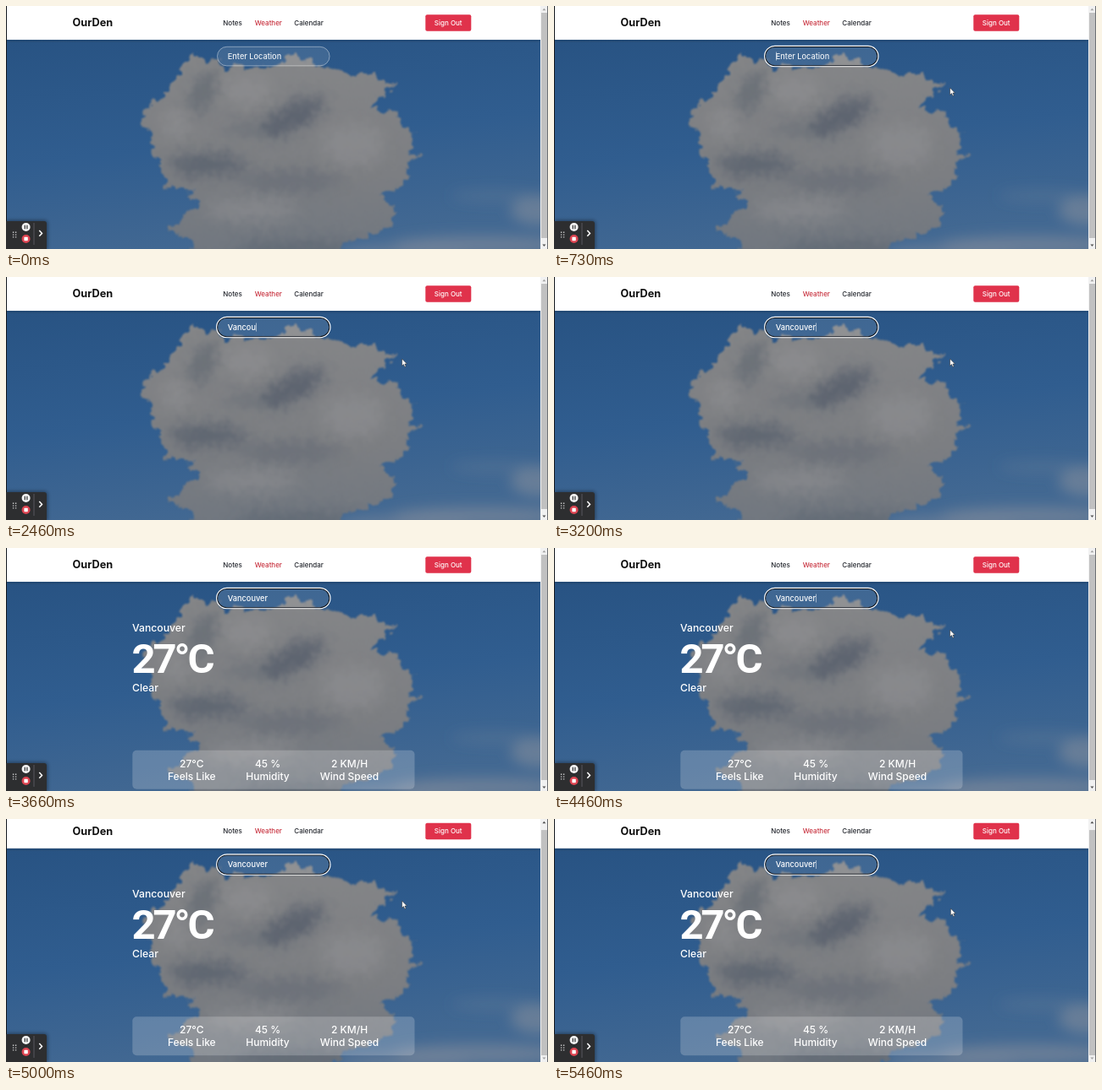
An HTML page for the animation above (5530 ms loop, 640 by 288 pixels).

```html
<!DOCTYPE html>
<html lang="en">
<head>
<meta charset="utf-8">
<title>Weather page</title>
<style>
  html, body { margin: 0; width: 100%; height: 100%; overflow: hidden; background: #fff; }
  svg { display: block; width: 640px; height: 288px; }
  text { font-family: Inter, Roboto, sans-serif; font-weight: 500; fill: #fff; white-space: pre; }
  .nav text { font-size: 8px; fill: #23262d; }
  .nav .brand { font-size: 12.7px; font-weight: 700; fill: #111; }
  .nav .active { fill: #c8323f; }
  .nav .button { fill: #fff; }
  .field { font-size: 9.2px; }
  .place { font-size: 12.2px; }
  .degrees { font: 700 49px Roboto, sans-serif; letter-spacing: -3.1px; }
  .stats text { font-size: 12px; text-anchor: middle; }
</style>
</head>
<body>
<svg viewBox="0 0 640 288">
  <defs>
    <linearGradient id="sky" x1="0" y1="0" x2="0.25" y2="1">
      <stop offset="0" stop-color="#285383"/>
      <stop offset="0.55" stop-color="#305d8f"/>
      <stop offset="1" stop-color="#426892"/>
    </linearGradient>
    <linearGradient id="body" x1="0" y1="0" x2="0" y2="1">
      <stop offset="0" stop-color="#858688"/>
      <stop offset="0.6" stop-color="#7c7e82"/>
      <stop offset="1" stop-color="#6f767f"/>
    </linearGradient>
    <filter id="ragged" x="-10%" y="-10%" width="120%" height="120%" color-interpolation-filters="sRGB">
      <feTurbulence type="fractalNoise" baseFrequency="0.09" numOctaves="4" seed="8"/>
      <feDisplacementMap in="SourceGraphic" scale="19" xChannelSelector="R" yChannelSelector="G"/>
      <feGaussianBlur stdDeviation="0.8"/>
    </filter>
    <filter id="soft" x="-60%" y="-60%" width="220%" height="220%"><feGaussianBlur stdDeviation="8"/></filter>
    <filter id="shade" x="-30%" y="-60%" width="160%" height="220%"><feGaussianBlur stdDeviation="2"/></filter>
    <clipPath id="inside"><polygon id="outline"/></clipPath>
    <clipPath id="photo"><rect y="40" width="631" height="254"/></clipPath>
  </defs>

  <rect width="640" height="288" fill="#fff"/>
  <g id="page">
    <g clip-path="url(#photo)">
      <rect y="40" width="631" height="254" fill="url(#sky)"/>
      <g filter="url(#soft)" fill="#77869a">
        <ellipse cx="560" cy="284" rx="105" ry="12" opacity=".75"/>
        <ellipse cx="628" cy="242" rx="32" ry="18" opacity=".7"/>
        <ellipse cx="470" cy="292" rx="80" ry="10" opacity=".6"/>
        <ellipse cx="575" cy="225" rx="50" ry="7" opacity=".25"/>
      </g>
      <g filter="url(#ragged)">
        <g clip-path="url(#inside)">
          <rect x="150" y="45" width="350" height="260" fill="url(#body)"/>
          <g filter="url(#soft)" fill="#555e6b">
            <ellipse cx="338" cy="132" rx="42" ry="15" transform="rotate(-28 338 132)" opacity=".85"/>
            <ellipse cx="238" cy="188" rx="46" ry="13" opacity=".75"/>
            <ellipse cx="232" cy="103" rx="13" ry="28" transform="rotate(24 232 103)" opacity=".5"/>
            <ellipse cx="335" cy="207" rx="62" ry="11" opacity=".4"/>
            <ellipse cx="345" cy="290" rx="75" ry="13" opacity=".45"/>
            <ellipse cx="285" cy="145" rx="30" ry="9" opacity=".35"/>
          </g>
          <g filter="url(#soft)" fill="#929294" opacity=".5">
            <ellipse cx="285" cy="100" rx="30" ry="18"/>
            <ellipse cx="410" cy="165" rx="38" ry="26"/>
            <ellipse cx="200" cy="140" rx="18" ry="16"/>
            <ellipse cx="290" cy="242" rx="55" ry="13"/>
          </g>
        </g>
      </g>
    </g>

    <g class="nav">
      <rect y="39" width="631" height="2.5" fill="#000" opacity=".25" filter="url(#shade)"/>
      <rect width="631" height="40" fill="#fff"/>
      <text class="brand" x="78.5" y="24.4">OurDen</text>
      <text x="256.3" y="22.8">Notes</text>
      <text class="active" x="293.7" y="22.8">Weather</text>
      <text x="340.3" y="22.8">Calendar</text>
      <rect x="495.3" y="10.3" width="54" height="19.4" rx="2" fill="#e0324b"/>
      <text class="button" x="522.2" y="22.9" text-anchor="middle">Sign Out</text>
    </g>

    <rect x="249.5" y="48.3" width="132.6" height="22.6" rx="11.3" fill="#fff" fill-opacity=".1" stroke="#fff" stroke-opacity=".4"/>
    <g id="ring" fill="none">
      <rect x="249.6" y="48.4" width="132.4" height="22.4" rx="11.2" stroke="#10151c" stroke-width="1.2"/>
      <rect x="248.6" y="47.4" width="134.4" height="24.4" rx="12.2" stroke="#fff" stroke-width="1.1"/>
    </g>
    <text class="field" id="field" x="261.8" y="62.6"></text>
    <rect id="caret" y="54.5" width=".7" height="10" fill="#fff" opacity=".75"/>

    <g id="report">
      <text class="place" x="149" y="98.8">Vancouver</text>
      <text class="degrees" x="148.5" y="147.5">27°C</text>
      <text class="place" x="149" y="169.8">Clear</text>
      <rect x="149.3" y="239.7" width="333.2" height="46" rx="5" fill="#fff" fill-opacity=".2"/>
      <g class="stats" id="stats"></g>
    </g>
  </g>

  <rect width="1" height="288" fill="#15191f"/>
  <rect x="631" width="9" height="288" fill="#f1f1f1"/>
  <rect id="thumb" x="632" y="8" width="7" height="267" fill="#c1c1c1"/>
  <path id="up" d="M633.4 5.2l2-2.4 2 2.4z"/>
  <path id="down" d="M633.4 282.6l2 2.4 2-2.4z"/>
  <rect x="639.3" width=".7" height="288" fill="#33373d"/>

  <g>
    <rect x="0" y="254" width="49" height="36" rx="4" fill="#000" opacity=".4" filter="url(#shade)"/>
    <path d="M0 255h45q3 0 3 3v30H0z" fill="#2d2e30"/>
    <path d="M8.6 267.6v7M11.6 267.6v7" stroke="#c9c9c9" stroke-width="1.4" stroke-dasharray="1.4 1.4"/>
    <circle cx="23.6" cy="262" r="5" fill="#f4f4f4"/>
    <path d="M22.3 259.7v4.6M24.9 259.7v4.6" stroke="#2d2e30" stroke-width="1.2"/>
    <circle cx="23.6" cy="276" r="5" fill="#dc4350"/>
    <rect x="21.4" y="273.8" width="4.4" height="4.4" rx=".6" fill="#fff"/>
    <path d="M33 257v26" stroke="#62646a" stroke-width=".8"/>
    <path d="M39.3 266l3.2 3.4-3.2 3.4" fill="none" stroke="#fff" stroke-width="1.5"/>
  </g>
  <path id="pointer" d="M0 0v8.2l1.9-1.7 1.3 3 1.4-.6-1.3-2.9h2.5z" fill="#fff" stroke="#222" stroke-width=".5"/>
</svg>
<script>
  const $ = id => document.getElementById(id);
  const LOOP = 5530, STEP = 1000 / 15, MAX_SCROLL = 5.5;
  const FOCUS = 400, REPORT = 3400;
  const WORD = 'Vancouver';
  const KEYS = [1330, 1600, 1800, 2000, 2200, 2400, 2730, 2860, 3060];

  $('outline').setAttribute('points', `
    208,72 221,56 233,62 248,64 262,73 300,71 322,69 340,56 353,62 367,72 386,74
    406,83 423,80 441,81 447,91 459,96 441,109 431,118 442,125 463,126 468,141
    481,150 482,162 475,177 493,177 473,186 475,201 467,213 440,222 453,236
    463,246 455,259 426,275 398,282 380,305 225,305 218,276 194,268 212,246
    226,237 222,222 190,212 181,186 172,178 175,164 160,133 166,121 192,100 200,85`);

  const stats = [[219.3, '27°C', 'Feels Like'], [309, '45 %', 'Humidity'], [405.5, '2 KM/H', 'Wind Speed']];
  $('stats').innerHTML = stats.map(([x, value, label]) =>
    `<text x="${x}" y="259.6">${value}</text><text x="${x}" y="274.6">${label}</text>`).join('');

  const ease = (t, from, to) => {
    const p = Math.min(1, Math.max(0, (t - from) / (to - from)));
    return p * p * (3 - 2 * p);
  };
  const show = (id, on) => { $(id).style.visibility = on ? 'visible' : 'hidden'; };

  function draw(now) {
    const t = Math.floor((now % LOOP + 7) / STEP) * STEP;

    const typed = KEYS.filter(k => t >= k - 5).length;
    const lastKey = typed ? KEYS[typed - 1] : FOCUS;
    const field = $('field');
    field.textContent = typed ? WORD.slice(0, typed) : 'Enter Location';
    field.style.opacity = typed ? 1 : 0.9;

    const focused = t >= FOCUS;
    show('ring', focused);
    show('caret', focused && Math.max(0, t - lastKey) % 1000 < 500);
    $('caret').setAttribute('x', 262 + (typed ? field.getComputedTextLength() : 0));
    show('report', t >= REPORT - 5);

    const scroll = MAX_SCROLL * ease(t, 4590, 4990);
    $('page').setAttribute('transform', `translate(0 ${-scroll})`);
    $('thumb').setAttribute('y', 8 + scroll * 0.93);
    $('up').setAttribute('fill', scroll > 0 ? '#505050' : '#a3a3a3');
    $('down').setAttribute('fill', scroll < MAX_SCROLL ? '#505050' : '#a3a3a3');

    const out = ease(t, 530, 700), drop = ease(t, 5060, 5400);
    const x = 382 + 85.6 * out + 0.8 * drop;
    const y = 66 + 31 * out + 9 * drop;
    $('pointer').setAttribute('transform', `translate(${x} ${y})`);
    show('pointer', t >= 530 && (t < REPORT - 5 || t >= 4390));
  }

  const start = performance.now();
  function tick() {
    draw(performance.now() - start);
    requestAnimationFrame(tick);
  }
  tick();
</script>
</body>
</html>
```
